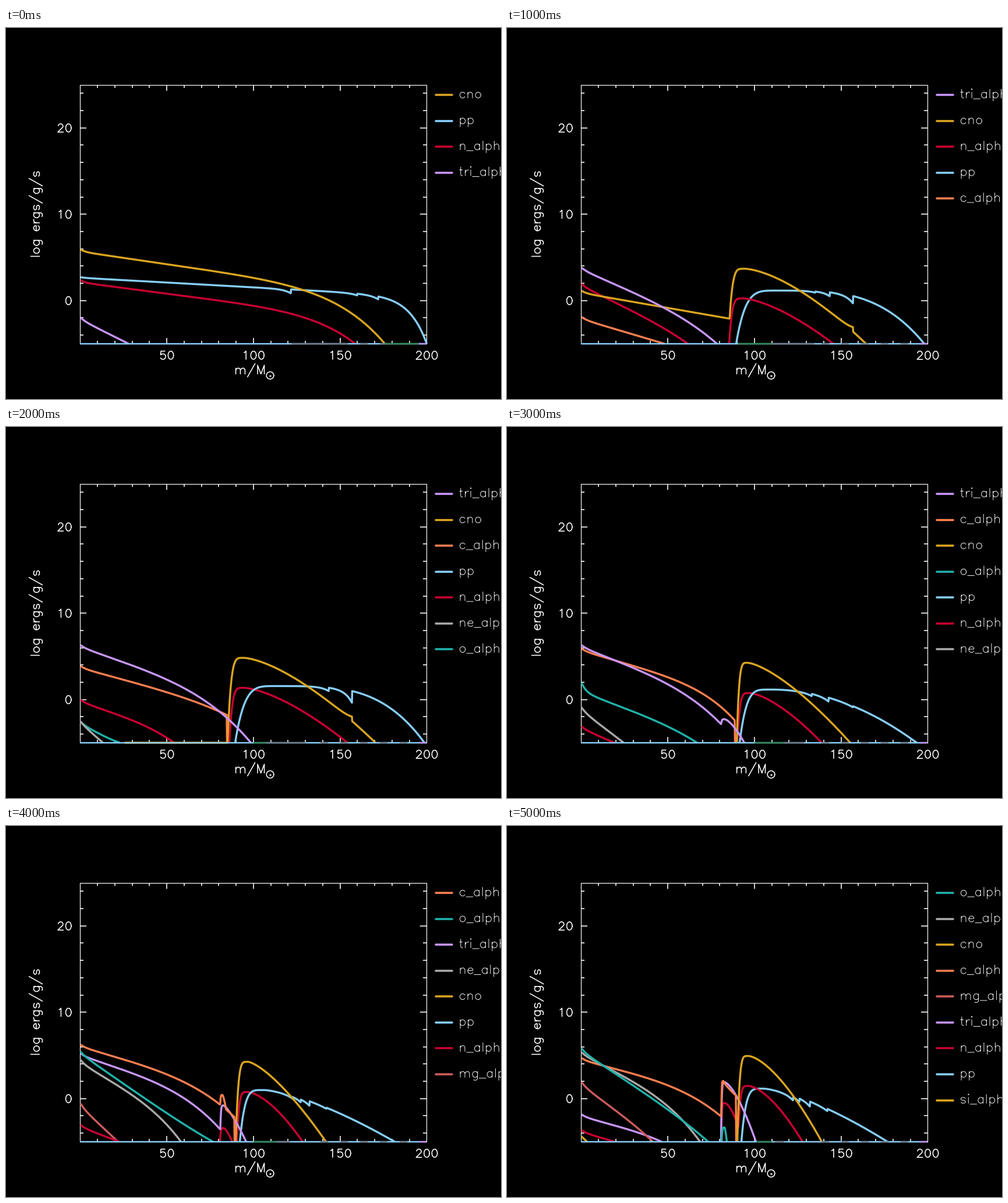
A matplotlib script for the animation above (6 s loop, 850 px wide and 638 px high).

```python
import numpy as np
import matplotlib.pyplot as plt
from matplotlib.animation import ArtistAnimation

W, H, DPI = 850, 638, 100
LEFT, RIGHT, TOP, FLOOR = 127, 722, 97, 542.5
PX = 72 / DPI

COLORS = {
    "cno": "#daa520", "pp": "#87cefa", "n": "#c80032", "tri": "#c896fa",
    "c": "#ff7f50", "ne": "#a9a9a9", "o": "#20b2aa", "mg": "#cd5c5c",
    "si": "#e0a818",
}
SLATE, GREEN = "#708090", "#2e8b57"

fig = plt.figure(figsize=(W / DPI, H / DPI), dpi=DPI, facecolor="black")
ax = fig.add_axes([0, 0, 1, 1])
ax.set_xlim(-0.5, W - 0.5)
ax.set_ylim(H - 0.5, -0.5)
ax.axis("off")


def stroke(x, y, color="white", width=1.6, z=2, cap="round"):
    return ax.plot(x, y, color=color, lw=width * PX, zorder=z,
                   solid_capstyle=cap, solid_joinstyle="round")[0]


# ---- single-stroke lettering: cap height 21, x-height 14 ----
def line(*xy):
    return np.array(xy, float).reshape(-1, 2)


def arc(cx, cy, rx, ry, a0=0, a1=360, n=15):
    t = np.radians(np.linspace(a0, a1, n))
    return np.column_stack([cx + rx * np.cos(t), cy + ry * np.sin(t)])


def path(*parts):
    return np.vstack(parts)


def hump(x):
    return path(line(x, 10), arc(x + 6, 9, 5, 5, 150, 0, 8), line(x + 11, 0))


BOWL = arc(9.5, 7, 6.5, 7, 32, 328)
STEM = line(4, 14, 4, 0)
TALL = line(4, 21, 4, 0)

# advance width, then strokes
GLYPHS = {
    " ": (16, []),
    "_": (16, [line(0, -2, 16, -2)]),
    "/": (22, [line(20, 25, 2, -7)]),
    "a": (19, [BOWL, line(15, 14, 15, 0)]),
    "c": (18, [BOWL]),
    "e": (18, [path(line(3, 8, 15, 8), BOWL)]),
    "g": (19, [BOWL, path(line(15, 14), arc(9.5, -2, 5.5, 5, 0, -130))]),
    "h": (19, [TALL, hump(4)]),
    "i": (8, [STEM, arc(4, 21, 1, 1, n=5)]),
    "l": (8, [TALL]),
    "m": (30, [STEM, hump(4), hump(15)]),
    "n": (19, [STEM, hump(4)]),
    "o": (19, [arc(9.5, 7, 6.5, 7)]),
    "p": (19, [line(4, 14, 4, -7), arc(9.5, 7, 6.5, 7, 148, -148)]),
    "r": (13, [STEM, arc(11, 7, 7, 7, 170, 80, 6)]),
    "s": (17, [path(arc(8.5, 10.5, 5.5, 3.5, 20, 260), arc(8.5, 3.5, 5.5, 3.5, 80, -160))]),
    "t": (12, [path(line(5, 21), arc(9, 4, 4, 4, 180, 280, 6)), line(2, 14, 9, 14)]),
    "M": (24, [line(4, 0, 4, 21, 12, 0, 20, 21, 20, 0)]),
    "0": (20, [arc(10, 10.5, 7, 10.5)]),
    "1": (20, [line(6, 17, 8, 18, 11, 21, 11, 0)]),
    "2": (20, [path(arc(10, 15, 6, 6, 170, -30), line(3, 0, 17, 0))]),
    "5": (20, [path(line(15, 21, 5, 21, 4, 12), arc(10, 7, 7, 7, 140, -150))]),
}


def text(s, x, y, scale, width=1.6, align=0, upright=False):
    """Letter s from baseline point (x, y); align 0, 0.5 or 1."""
    pen = -align * sum(GLYPHS[ch][0] for ch in s)
    parts = []
    for ch in s:
        adv, strokes = GLYPHS[ch]
        for p in strokes:
            parts += [p + (pen, 0), [[np.nan, np.nan]]]
        pen += adv
    u, v = np.vstack(parts).T * scale
    if upright:
        u, v = -v, u
    return stroke(x + u, y - v, width=width)


# ---- fixed axes ----
def px(m):
    return LEFT + (RIGHT - LEFT) * m / 200


def py(v):
    return FLOOR - (FLOOR - TOP) * (v + 5) / 30


stroke([LEFT, RIGHT, RIGHT, LEFT, LEFT], [TOP, TOP, FLOOR, FLOOR, TOP], width=1.2)
for m in range(10, 200, 10):
    n = 10 if m % 50 == 0 else 5
    stroke([px(m)] * 2, [TOP, TOP + n], cap="butt")
    stroke([px(m)] * 2, [FLOOR, FLOOR - n], cap="butt")
for v in range(-4, 25, 2):
    n = 11 if v % 10 == 0 else 6
    stroke([LEFT, LEFT + n], [py(v)] * 2, cap="butt")
    stroke([RIGHT, RIGHT - n], [py(v)] * 2, cap="butt")
for m in (50, 100, 150, 200):
    text(str(m), px(m), 569.3, 0.675, align=0.5)
for v in (0, 10, 20):
    text(str(v), 113.5, py(v) + 7.2, 0.675, align=1)
text("m/M", 391.2, 594.5, 0.72)
text("log ergs/g/s", 57, py(10), 0.72, align=0.5, upright=True)
stroke(*arc(453, 597, 6.3, 6.3, n=25).T)
stroke([452.5, 453.5], [597, 597], width=2.6)


# ---- curve shapes, in pixels ----
X = np.arange(LEFT + 0.5, RIGHT + 0.5, 0.5)


def fall(y0, x1, a=1.0, q=4, cusp=4, cut=RIGHT):
    """Central cusp, then a linear drop that steepens toward the floor at x1."""
    u = np.clip((X - LEFT) / (x1 - LEFT), 0, 1)
    base = y0 + cusp
    y = base + (FLOOR - base) * (a * u + (1 - a) * u ** q)
    y -= cusp * np.exp((LEFT - X) / 8)
    return np.where(X < min(x1, cut), y, FLOOR)


def shell(x0, xp, yp, x1, p=1.5, cut=RIGHT):
    """Steep rise at x0 to a peak (xp, yp), then a slow fall to x1."""
    s = np.clip((X - x0) / (xp - x0), 0, 1)
    v = np.clip((X - xp) / (x1 - xp), 0, 1)
    y = yp + (FLOOR - yp) * ((1 - s) ** 5 + v ** p)
    return np.where(X < cut, y, FLOOR)


def steps(y, *marks):
    """Sag by h just before each x, then jump back."""
    for x, h in marks:
        y = y + np.where(X < x, h * np.exp(np.minimum(X - x, 0) / 12), 0)
    return y


def scene(green, slate, **curves):
    arts = [stroke([LEFT, RIGHT], [FLOOR] * 2, COLORS["pp"], 2.4, 6, "butt")]
    dashes = [(x, x + 13, SLATE) for x in range(540, 700, 34)]
    dashes += [(*slate, SLATE), (*green, GREEN), (709, RIGHT, COLORS["tri"])]
    for x0, x1, color in dashes:
        arts.append(stroke([x0, x1], [FLOOR] * 2, color, 2.4, 7, "butt"))
    for k, (name, parts) in enumerate(curves.items()):
        y = np.minimum(np.atleast_2d(parts).min(axis=0), FLOOR)
        low = y >= FLOOR
        flat = low & np.r_[True, low[:-1]] & np.r_[low[1:], True]
        arts.append(stroke(X, np.where(flat, np.nan, y), COLORS[name],
                           3.4, 5 - 0.1 * k, "butt"))
        row = 114.7 + 44.55 * k
        label = name if name in ("cno", "pp") else name + "_alpha"
        arts += [stroke([737.5, 765.5], [row, row], COLORS[name], 3.6),
                 text(label, 776.7, row + 5.2, 0.72, 0.95)]
    return arts


scenes = [
    scene((650, 709), (490, 583),
          cno=fall(380, 650, 0.48, 6.6),
          pp=steps(fall(428, 722, 0.29, 20, cusp=1), (489, 7), (603, 3), (639, 5)),
          n=fall(433, 599, 0.58, 7),
          tri=fall(497, 210)),
    scene((397, 455), (455, 528),
          tri=fall(411, 360, 0.8),
          cno=(fall(451, 630, cut=382),
               steps(shell(379.5, 408, 413.5, 616, 1.55), (594, -8))),
          n=(fall(439, 310, 0.9), shell(381, 405, 464.5, 560)),
          pp=steps(shell(393, 470, 451, 716, 3.3), (529, 2), (554, 7), (594, 13)),
          c=fall(496, 270)),
    scene((425, 447), (447, 515),
          tri=fall(374, 420, 0.62),
          cno=steps(shell(380, 408, 396.5, 634), (594, -8)),
          c=fall(410, 460, 0.7, cut=379),
          pp=steps(shell(393, 470, 445, 718, 3.5), (554, 6), (594, 21)),
          n=(fall(468, 288, 0.78), shell(383, 408, 448, 586)),
          ne=fall(505, 166),
          o=fall(506, 195, 1.1)),
    scene((425, 475), (475, 510),
          tri=(fall(374, 395, 0.64, cut=371), shell(365, 373, 502, 407)),
          c=fall(380, 420, 0.54, 5, cut=391),
          cno=shell(394, 413, 405, 589, 1.42),
          o=fall(438, 326, 0.85, cusp=17),
          pp=steps(shell(399, 455, 451, 703, 2), (523, 4), (552, 7), (594, 2)),
          n=(fall(514, 184), shell(395, 416, 457, 540)),
          ne=fall(481, 200, cusp=6)),
    scene((425, 463), (463, 488),
          c=(fall(375, 430, 0.54, cut=392), shell(366, 371, 462, 385)),
          o=fall(387, 355, 1.05),
          tri=(fall(390, 385, 0.58, cut=368), shell(367, 373, 480, 412, 1.3)),
          ne=fall(401, 300, 0.76, cusp=6),
          cno=shell(394, 415, 405, 549, 1.4),
          pp=steps(shell(401, 443, 453.5, 667, 1.45),
                   (492, 3), (506, 5), (521, 8), (550, 2)),
          n=(fall(513, 194), shell(367, 373, 519, 388), shell(396, 414, 457, 509, 1.6)),
          mg=fall(476, 192, cusp=6)),
    scene((428, 455), (460, 476),
          o=(fall(381, 345, 0.92, cusp=6), shell(368, 373, 518, 377)),
          ne=fall(388, 331, 0.7),
          cno=shell(395, 414, 395, 540, 1.55),
          c=(fall(398, 410, 0.52, cut=368), shell(367, 371, 438, 500, 0.8, cut=393)),
          mg=fall(439, 250, 0.93, cusp=6),
          tri=(fall(495, 265, 0.85), shell(367, 373, 440, 427)),
          n=(fall(522, 185), shell(367, 373, 476, 405, 1.7),
             shell(396, 414, 446.5, 507, 1.6)),
          pp=steps(shell(402, 440, 451, 653, 1.45),
                   (491, 6), (502, 6), (520, 9), (550, 4)),
          si=fall(533, 137, cusp=0)),
]

anim = ArtistAnimation(fig, scenes, interval=1000, repeat=True,
                       repeat_delay=0, blit=False)
plt.show()
```
